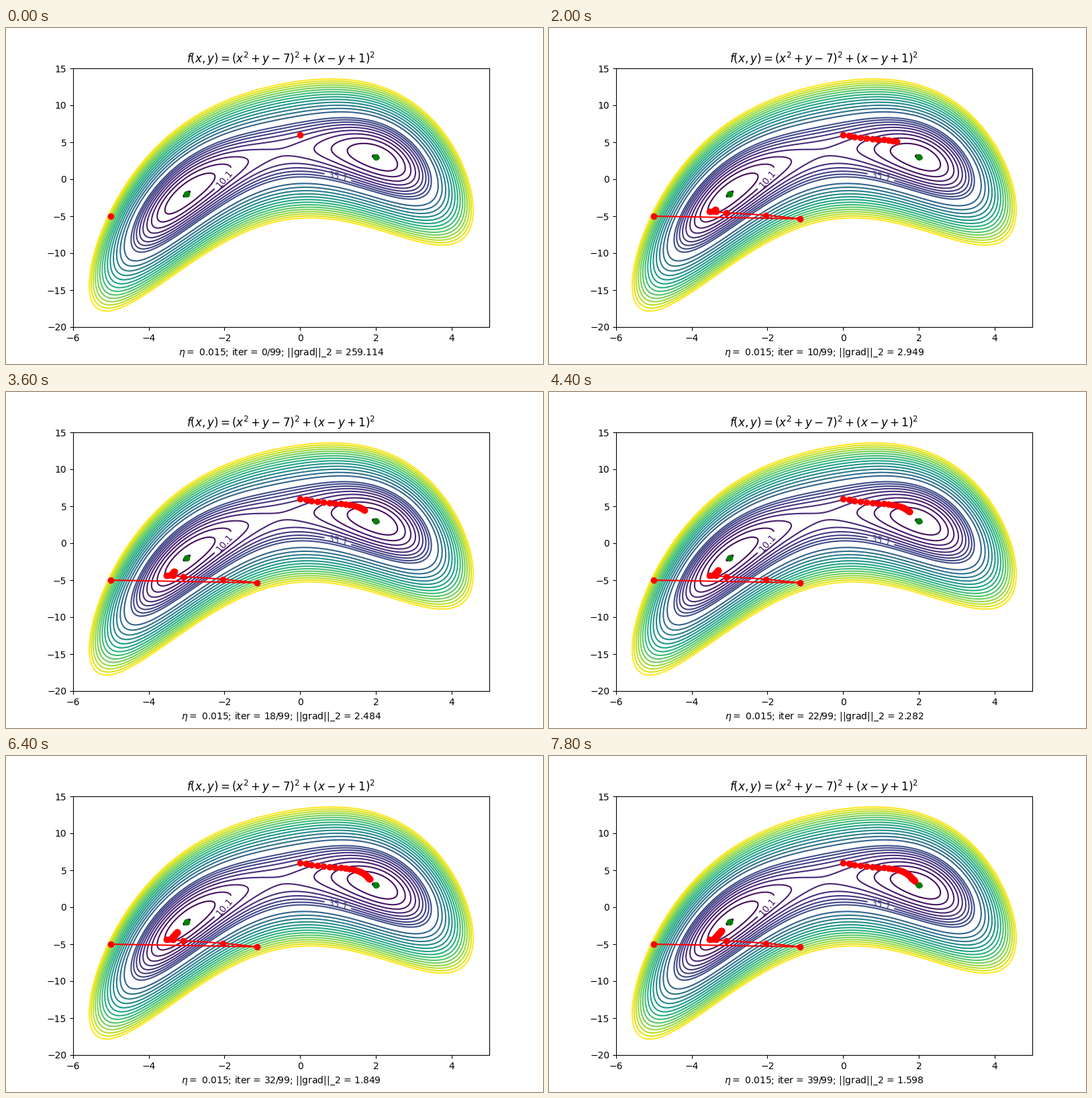
A matplotlib script for the animation above (8000 ms loop, 800 by 500 pixels).

```python
import numpy as np
import matplotlib.pyplot as plt
from matplotlib.animation import FuncAnimation

ETA = 0.015
TOTAL = 99
FRAMES = 40
STEP_MS = 200


def f(x, y):
    return (x**2 + y - 7)**2 + (x - y + 1)**2


def grad(p):
    x, y = p
    u, v = x**2 + y - 7, x - y + 1
    return np.array([4 * x * u + 2 * v, 2 * u - 2 * v])


def descend(start):
    path = [np.array(start, float)]
    for _ in range(FRAMES - 1):
        path.append(path[-1] - ETA * grad(path[-1]))
    return np.array(path)


paths = [descend((-5, -5)), descend((0, 6))]

fig, ax = plt.subplots(figsize=(8, 5), dpi=100)
X, Y = np.meshgrid(np.linspace(-6, 5, 400), np.linspace(-20, 15, 400))
levels = np.concatenate([np.arange(0.1, 50, 5), np.arange(60.1, 195, 10)])
contours = ax.contour(X, Y, f(X, Y), levels=levels, cmap="viridis")
ax.clabel(contours, fmt="%1.1f", fontsize=10, inline=True,
          manual=[(-2, 0), (1, 0.33)])
ax.set_xlim(-6, 5)
ax.set_ylim(-20, 15)
ax.set_title(r"$f(x, y) = (x^2 + y - 7)^2 + (x - y + 1)^2$")

for minimum in [(-3, -2), (2, 3)]:
    ax.plot(*minimum, "go")
trails = [ax.plot([], [], "ro-")[0] for _ in paths]


def update(i):
    for trail, path in zip(trails, paths):
        trail.set_data(path[:i + 1, 0], path[:i + 1, 1])
    norm = np.linalg.norm(grad(paths[0][i]))
    ax.set_xlabel(rf"$\eta = $ {ETA}; iter = {i}/{TOTAL}; "
                  rf"||grad||_2 = {norm:.3f}")
    return trails


anim = FuncAnimation(fig, update, frames=FRAMES, interval=STEP_MS,
                     init_func=lambda: update(0), repeat=True)
plt.show()
```
